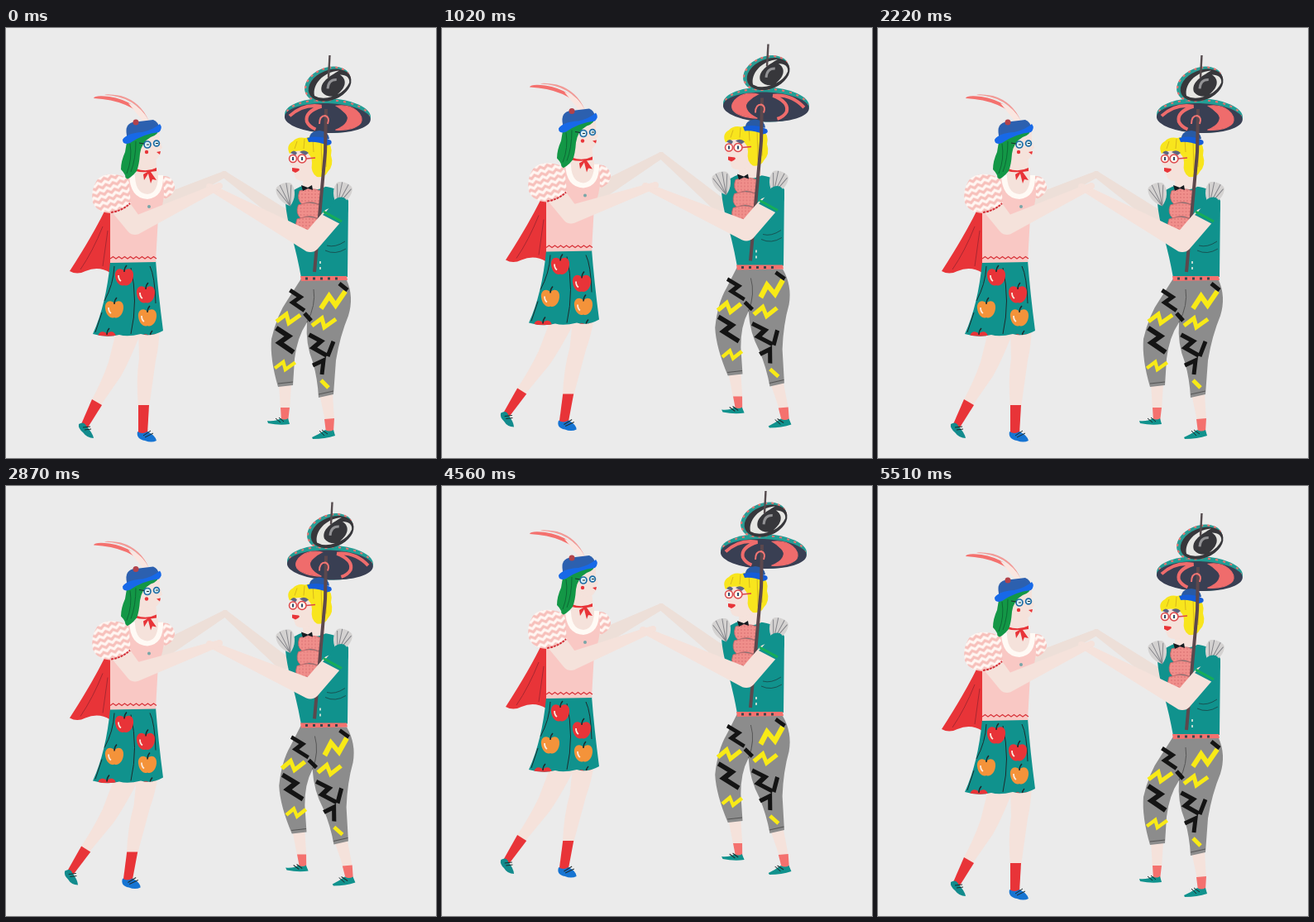
These frames come from a looping animation (520 by 520 pixels, 6000 ms). An HTML page:

```html
<!DOCTYPE html>
<html lang="en">
<head>
<meta charset="utf-8">
<title>Dancing couple</title>
<style>
  html, body { margin: 0; width: 100%; height: 100%; overflow: hidden; background: #ebebeb; }
  svg { display: block; width: 100vw; height: 100vh; }
  .skin { fill: #f5e2db; }
  .far { fill: #eddfd8; }
  .teal { fill: #10928d; }
  .red { fill: #e83438; }
  .coral { fill: #f4716e; }
  .pink { fill: #f9c8c4; }
  .line { fill: none; stroke: #1d2b2d; }
  .bolts { fill: none; stroke-width: 5; }
  .yellow { stroke: #f8ea16; }
  .black { stroke: #141414; }
</style>
</head>
<body>
<svg id="stage" viewBox="0 0 520 520">
  <defs>
    <pattern id="chevron" width="9" height="8" patternUnits="userSpaceOnUse" patternTransform="rotate(-15)">
      <rect width="9" height="8" fill="#f7c0bb"/>
      <path d="M-1 6L4.5 2L10 6" fill="none" stroke="#fff6f2" stroke-width="3.4"/>
    </pattern>
    <pattern id="frill" width="4" height="4" patternUnits="userSpaceOnUse">
      <rect width="4" height="4" fill="#f08f8b"/>
      <circle cx="2" cy="2" r=".7" fill="#cf6266"/>
    </pattern>
    <g id="apple">
      <path d="M0-7C4-12 12-10 11-1C10 8 4 12 0 10C-4 12-10 8-11-1C-12-10-4-12 0-7Z"/>
      <path class="line" d="M0-6Q0-11 3-14" stroke-width="1.5"/>
      <path d="M-7-2Q-7 3-4 5" fill="none" stroke="#fbe9dc" stroke-width="1.8"/>
    </g>
    <g id="fan">
      <path d="M0 15C-9 9-13-2-10-10C-7-15 7-15 10-10C13-2 9 9 0 15Z" fill="#d4d2d1"/>
      <path d="M0 15L-9-9M0 15L-4-13M0 15L4-13M0 15L9-9" fill="none" stroke="#85858a"/>
    </g>
    <path id="bolt" d="M-14 4L-2-5L1 6L15-4"/>
    <path id="lump" d="M-13-6Q0-11 13-6Q17 4 10 10Q0 5-10 10Q-17 4-13-6Z" fill="url(#frill)" stroke="#c4666a" stroke-width=".8"/>
    <path id="skirt" d="M126 283L181 281Q184 320 190 366Q176 374 163 370Q147 374 137 371Q122 375 105 370Q121 335 126 283Z"/>
    <clipPath id="skirtShape"><use href="#skirt"/></clipPath>
  </defs>

  <rect width="520" height="520" fill="#ebebeb"/>
  <path id="womanFar" class="far"/>
  <path id="manFar" class="far"/>

  <g class="woman">
    <path class="red" d="M126 207Q110 243 77 294Q86 299 96 294Q112 287 126 296Z"/>
    <path d="M117 240Q105 270 90 292M123 245L117 288" fill="none" stroke="#a92730"/>

    <g id="womanLegs">
      <path class="skin" d="M135 360L166 360Q152 398 139 421L114 457L103 451Q116 427 124 404Z"/>
      <path class="skin" d="M160 360L186 360Q185 386 181 402L173 459L160 459Q157 424 161 400Z"/>
      <path class="red" d="M104 449L116 456L99 483L91 479Z"/>
      <path class="red" d="M160 456L173 456L171 491L160 490Z"/>
      <path d="M88 479Q94 475 97 481Q105 490 106 496Q98 496 93 489Q87 484 88 479Z" fill="#128b8d"/>
      <path d="M159 488Q165 492 171 488Q181 493 182 499Q176 502 168 499Q157 497 159 488Z" fill="#1674d2"/>
      <path class="line" d="M93 483L102 482M95 486L103 485M166 493L175 487M168 495L178 490"/>
    </g>

    <use href="#skirt" class="teal"/>
    <g clip-path="url(#skirtShape)">
      <path class="line" d="M131 288Q130 310 119 330M151 290Q160 330 151 370M174 288Q180 300 181 333M116 344L108 368"/>
      <g class="red">
        <use href="#apple" x="143" y="301"/>
        <use href="#apple" x="169" y="322"/>
        <use href="#apple" x="122" y="377"/>
        <use href="#apple" x="174" y="380"/>
      </g>
      <g fill="#f4933a">
        <use href="#apple" x="131" y="340"/>
        <use href="#apple" x="171" y="350"/>
      </g>
    </g>

    <path d="M187 180Q199 176 204 190Q205 202 191 207Z" fill="url(#chevron)"/>
    <path class="pink" d="M146 178L189 178Q195 205 184 229L181 283L126 284L126 210Z"/>
    <path id="hem" fill="none" stroke="#d8363c" stroke-width="1.3"/>
    <path d="M149 178Q150 206 171 207Q191 205 190 178Z" fill="#fffaf5"/>
    <path class="skin" d="M156 174Q155 200 171 201Q185 200 184 174Z"/>
    <circle cx="173" cy="216" r="2" fill="#78a6a8"/>
    <path class="skin" d="M158 152L181 154L183 176Q171 180 156 174Z"/>
    <path class="red" d="M157 170Q170 175 182 169L182 173L175 174L182 184L177 183L175 188L172 176L167 184L166 177L171 174Q163 175 157 173Z"/>

    <path class="skin" d="M162 129L186 123L186 137L189 145L186 147L187 152L183 158Q177 163 168 159L158 154Z"/>
    <path d="M147 132L185 121Q185 129 175 132Q164 138 162 152Q161 166 158 173Q150 183 144 183Q146 178 139 171Q139 161 144 150Z" fill="#139746"/>
    <path d="M150 140Q153 158 146 176M157 137Q157 158 151 174" fill="none" stroke="#0c6a35"/>
    <circle class="red" cx="170" cy="150" r="2.2"/>
    <path class="red" d="M182 150L187 149L186 153Z"/>
    <g fill="#d9eef5" stroke="#1d6da5" stroke-width="1.7">
      <circle cx="171" cy="141" r="4"/><circle cx="182" cy="139.5" r="3.4"/>
    </g>
    <path class="line" d="M170 141h3m8-1.5h3M161 139l6 1"/>
    <g class="coral">
      <path d="M172 113Q150 87 106 85Q107 81 125 83Q157 88 172 113Z"/>
      <path d="M173 113Q156 82 119 81Q121 79 139 82Q163 89 173 113Z" fill="#f29a96"/>
      <path d="M173 113Q164 95 148 91L166 113Z" fill="#fae6e0"/>
    </g>
    <path d="M147 134Q142 117 153 114L178 111Q184 113 186 122Z" fill="#2c60af"/>
    <path d="M141 135Q146 127 165 126Q178 123 186 116Q190 121 185 126Q166 128 150 139Q141 142 141 135Z" fill="#1769e8"/>
    <circle cx="157" cy="114" r="3.5" fill="#b2434b"/>
  </g>

  <g class="man">
    <g id="manLegs">
      <path class="skin" d="M330 430L345 430L343 462L332 462ZM379 442L395 442L397 475L386 475Z"/>
      <path class="coral" d="M332 459L343 459L341 476L333 476ZM385 473L397 472L396 488L387 489Z"/>
      <path class="teal" d="M316 475Q326 476 332 472Q337 475 341 472L343 479Q331 481 317 478ZM370 495Q379 491 386 486Q391 489 396 486L398 493Q386 497 371 497Z"/>
      <path class="line" d="M326 472l6 5m-2-6l6 5M379 487l6 6m-3-7l7 5"/>
      <path d="M357 303L412 305Q421 325 414 348Q404 372 399 402L396 443L378 447Q377 425 371 404Q362 382 364 356Q352 374 349 400L347 432L329 434Q319 400 321 376Q328 346 341 328Z" fill="#8c8c8c"/>
      <path d="M364 356Q375 335 372 316M329 430L347 428M378 443L396 439" fill="none" stroke="#555"/>
      <g class="bolts black">
        <use href="#bolt" transform="translate(352 329) rotate(70)"/>
        <use href="#bolt" transform="translate(337 377) rotate(70) scale(1.2)"/>
        <use href="#bolt" transform="translate(377 383) rotate(65) scale(1.1)"/>
        <path d="M371 408L384 402L382 419M389 397L396 379M403 309L413 317M361 345L369 354"/>
      </g>
      <g class="bolts yellow">
        <use href="#bolt" transform="translate(341 351)"/>
        <use href="#bolt" transform="translate(395 329) rotate(-20) scale(1.2)"/>
        <use href="#bolt" transform="translate(384 356)"/>
        <use href="#bolt" transform="translate(337 408) scale(.85)"/>
        <path d="M381 426L390 435"/>
      </g>
    </g>

    <path class="teal" d="M340 203Q348 194 361 190L388 192Q408 195 414 209L413 301L357 302Q352 274 345 250Q339 226 338 212Z"/>
    <path class="line" d="M410 258Q398 266 388 263M411 267Q398 275 386 269" stroke-opacity=".6"/>
    <use href="#fan" transform="translate(339 201) rotate(-18)"/>
    <use href="#fan" transform="translate(406 200) rotate(20)"/>
    <path class="coral" d="M356 300L412 300L413 305L357 306Z"/>
    <path d="M362 303h45" stroke="#39454b" stroke-width="3" stroke-dasharray="3 6"/>
    <path d="M380 282v3m0 4v3" stroke="#f7f2e7" stroke-width="1.5"/>

    <g id="canopy">
      <g transform="translate(389 106) rotate(2)">
        <ellipse rx="52" ry="21" fill="#229e95"/>
        <ellipse rx="50" ry="19" fill="none" stroke="#ef7270" stroke-width="2" stroke-dasharray="3 6"/>
        <ellipse cy="3" rx="52" ry="18" fill="#393f53"/>
        <g id="swirl" fill="none" stroke="#ef6c6c">
          <path d="M10-12C30-16 46-2 40 8C34 15 20 17 10 17C24 11 28 2 21-4Q16-9 10-12Z" fill="#ef6c6c"/>
          <path d="M-46 2Q-30-14-8-11Q-28-4-25 8Q-22 14-14 17" stroke-width="4"/>
        </g>
      </g>
      <g transform="translate(389 68) rotate(-22)">
        <ellipse rx="29" ry="20" fill="#2a9d95"/>
        <ellipse rx="28" ry="19" fill="none" stroke="#ef7270" stroke-width="2" stroke-dasharray="3 5"/>
        <ellipse cx="2" cy="2" rx="27" ry="18" fill="#37373b"/>
        <path d="M-20 7C-18-6 0-16 19-10C6-8-9-6-10 6Q-8 13 0 16Q-14 15-20 7ZM6 16C20 12 24 3 18-5Q29 0 25 8Q18 15 6 16Z" fill="#e6e6e3"/>
        <path d="M-2 5Q3-5 12-1" fill="none" stroke="#929295" stroke-width="3"/>
      </g>
      <path d="M391.500 33L390 60" stroke="#554b4e" stroke-width="2.400"/>
    </g>

    <path class="skin" d="M359 173L384 170L386 192Q372 199 359 193Z"/>
    <path class="skin" d="M346 142L381 139L385 173Q376 185 359 185Q350 185 349 178L346 172L348 168L343 165L347 156Z"/>
    <path d="M343 152Q338 142 347 137Q352 131 362 133Q376 128 386 135Q396 142 393 154Q397 166 389 174Q386 181 376 180Q368 175 370 163Q370 154 363 150Q352 146 343 152Z" fill="#f8e51d"/>
    <path d="M352 137l-3 9m12-12l-1 12m11-12l1 16m9-15l1 38m6-31l-1 26" fill="none" stroke="#d8b71c"/>
    <path d="M344 151Q348 146 352 151L350 154ZM355 150Q361 146 366 151L362 154Z" fill="#5f6581"/>
    <g fill="#fff5ec" stroke="#dd4549" stroke-width="1.5">
      <circle cx="347" cy="158" r="4.500"/><circle cx="358" cy="158" r="5"/>
      <path d="M363 158l11-1"/>
    </g>
    <path d="M347 156v4m11-4v4" stroke="#334b6d" stroke-width="2"/>
    <path class="red" d="M346 169L354 170Q357 172 350 175L346 173Z"/>
    <path d="M367 135Q366 125 379 124Q390 125 391 134Z" fill="#285aa4"/>
    <path d="M364 133Q378 129 393 136Q396 141 388 142Q377 137 366 138Z" fill="#155dd8"/>
    <g id="jabot"></g>
    <path d="M357 190L365 193L370 190L371 196L365 194L359 197Z" fill="#151b20"/>
    <path d="M387 98L386 150L373 295" fill="none" stroke="#5c484d" stroke-width="4"/>
    <path d="M379 116Q379 106 386 106Q392 108 389 116" fill="none" stroke="#f17573" stroke-width="2"/>
  </g>

  <path id="manNear" class="skin"/>
  <path id="womanNear" class="skin"/>

  <g class="woman">
    <path d="M105 211Q102 196 110 184Q119 174 137 178Q150 180 149 192L151 212Q141 222 126 224Q110 223 105 211Z" fill="url(#chevron)"/>
    <path d="M127 223Q141 221 150 212" fill="none" stroke="#d3343c" stroke-width="2" stroke-dasharray="3 1"/>
  </g>
  <g class="man">
    <path class="teal" d="M398 207Q410 200 414 213Q415 226 406 238L383 226Q391 219 398 207Z"/>
    <path d="M384 222L406 234" stroke="#16ad59" stroke-width="3"/>
  </g>
</svg>

<script>
const byId = id => document.getElementById(id);

byId('hem').setAttribute('d', 'M126 279' + 'l3.500 -2.500l3.500 2.500'.repeat(8));
for (let i = 3; i >= 0; i--)
  byId('jabot').innerHTML += `<use href="#lump" x="${368 - i * 1.5}" y="${203 + i * 17}"/>`;

// Hands are stage points; woman, man and y shift the bodies; lean slants the legs.
const dip = { far: [264, 177], near: [254, 191] };
const hop = { far: [265, 154], near: [254, 190], y: -13.5, lean: 1 };
const jump = { far: [265, 146], near: [251, 173], y: -27, lean: 1 };
const closeJump = { far: [268, 123], near: [244, 219], y: -27, lean: 1, woman: 30, man: -23, raised: true };
const closeDip = { ...closeJump, far: [268, 150], near: [244, 246], y: 0, lean: 0 };

const finale = [
  [2960, dip], [3100, closeJump], [3340, closeDip], [3850, closeJump], [4090, dip],
  [4560, jump], [4750, dip], [4940, jump], [5130, dip], [5320, jump], [5510, dip]
];

function poseAt(time) {
  if (time < 2960) return time % 370 < 280 ? dip : hop;
  return finale.findLast(([start]) => start <= time)[1];
}

// Round-jointed limb whose radius changes from joint to joint.
function limb(...joints) {
  const disc = ([x, y, r]) => `M${x + r} ${y}a${r} ${r} 0 0 0 ${-2 * r} 0a${r} ${r} 0 0 0 ${2 * r} 0Z`;
  const bone = ([ax, ay, ar], [bx, by, br]) => {
    const length = Math.hypot(bx - ax, by - ay);
    const nx = (ay - by) / length, ny = (bx - ax) / length;
    return `M${ax + nx * ar} ${ay + ny * ar}L${bx + nx * br} ${by + ny * br}` +
      `L${bx - nx * br} ${by - ny * br}L${ax - nx * ar} ${ay - ny * ar}Z`;
  };
  return joints.map((joint, i) => disc(joint) + (i ? bone(joints[i - 1], joint) : '')).join('');
}

const slant = (id, amount, hip) =>
  byId(id).setAttribute('transform', `matrix(1 0 ${amount} 1 ${-amount * hip} 0)`);

function show({ far, near, y = 0, lean = 0, woman = 0, man = 0, raised = false }) {
  for (const [name, x] of Object.entries({ woman, man }))
    for (const part of document.querySelectorAll('.' + name))
      part.setAttribute('transform', `translate(${x} ${y})`);
  slant('womanLegs', -0.13 * lean, 350);
  slant('manLegs', 0.13 * lean, 305);

  const her = (px, py, r) => [px + woman, py + y, r];
  const his = (px, py, r) => [px + man, py + y, r];
  const draw = (id, ...joints) => byId(id).setAttribute('d', limb(...joints));
  const [fx, fy] = far, [nx, ny] = near;
  draw('womanFar', her(189, 212, 10), ...(raised ? [her(193, 254, 8)] : []), [fx, fy, 4]);
  draw('manFar', his(335, raised ? 240 : 227, 9), [fx, fy, 4]);
  draw('womanNear', her(139, 217, 12), her(156, 239, 11), [nx + 4, ny, 4]);
  draw('manNear', his(393, 230, 12), his(368, 259, 12), [nx - 8, ny + 1, 4]);

  const hopping = lean && y > -20;
  byId('canopy').setAttribute('transform', `translate(${hopping ? 3 : 0} 0)`);
  byId('swirl').setAttribute('transform', `scale(${hopping ? -1 : 1} 1)`);
}

let current;
function tick() {
  const next = poseAt(performance.now() % 6000);
  if (next !== current) show(current = next);
  requestAnimationFrame(tick);
}
tick();
</script>
</body>
</html>
```
